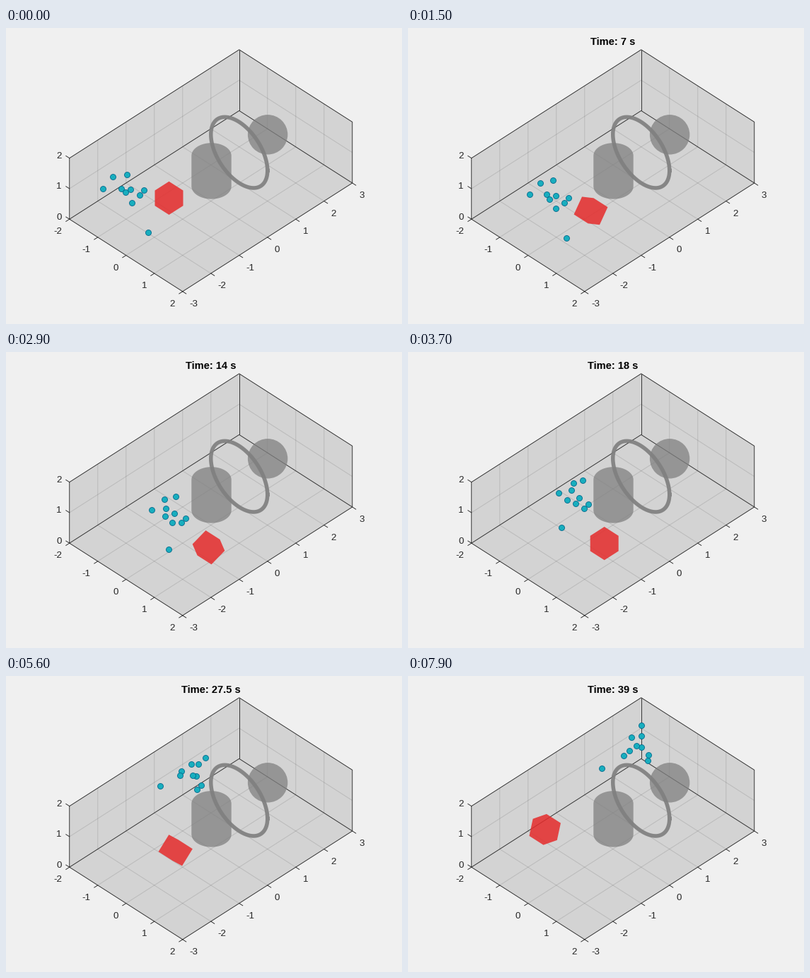
Animation, 560 px wide and 420 px high, one loop 8000 ms. Source, as a matplotlib script:

```python
import numpy as np
import matplotlib.pyplot as plt
from matplotlib.animation import FuncAnimation
from matplotlib.patches import Circle, Polygon

W, H, DPI = 560, 420, 100
FRAMES, INTERVAL = 80, 100
PT = 72 / DPI                      # points per pixel

BACK, PANE, INK = "#f0f0f0", "#d3d3d3", "#262626"
GRAY, RED = "#808080", "#e52b2b"
TEAL, TEAL_EDGE = "#18aebe", "#00648a"
FILL_SHIFT = np.array([0.75, 0.6])  # fills sit on pixel centres, lines do not

plt.rcParams["font.family"] = "Liberation Sans"


def project(x, y, z):
    """Orthographic view, azimuth 45 and elevation 40, in pixels."""
    return np.array([290 + 40 * (x + y), 245.7 + 25.65 * (x - y) - 43.3 * z])


fig = plt.figure(figsize=(W / DPI, H / DPI), dpi=DPI, facecolor=BACK)
ax = fig.add_axes([0, 0, 1, 1])
ax.set_xlim(0.25, W + 0.25)
ax.set_ylim(H + 0.1, 0.1)
ax.axis("off")


def face(*points):
    ax.add_patch(Polygon([project(*p) for p in points], fc=PANE, lw=0, zorder=0))


def line(*points, color=INK, alpha=1.0, width=0.9):
    xy = np.array([project(*p) for p in points])
    ax.plot(xy[:, 0], xy[:, 1], color=color, alpha=alpha, lw=width * PT,
            solid_capstyle="butt", zorder=1)


def tick(point, shift, label, offset, align):
    px, py = project(*point)
    ax.plot([px, px + shift[0]], [py, py + shift[1]], color=INK,
            lw=0.9 * PT, zorder=1)
    ax.text(px + offset[0], py + offset[1], str(label), color=INK,
            fontsize=13.33 * PT, ha=align, va="center_baseline")


# Box, grid and axes
face((-2, -3, 0), (2, -3, 0), (2, 3, 0), (-2, 3, 0))
face((-2, -3, 0), (-2, 3, 0), (-2, 3, 2), (-2, -3, 2))
face((-2, 3, 0), (2, 3, 0), (2, 3, 2), (-2, 3, 2))

grid = dict(alpha=0.14, width=1)
for x in (-1, 0, 1):
    line((x, -3, 0), (x, 3, 0), (x, 3, 2), **grid)
for y in range(-2, 3):
    line((2, y, 0), (-2, y, 0), (-2, y, 2), **grid)
line((-2, -3, 1), (-2, 3, 1), (2, 3, 1), **grid)

line((-2, -3, 0), (2, -3, 0), (2, 3, 0), (-2, 3, 0), (-2, -3, 0))
line((-2, -3, 0), (-2, -3, 2), (-2, 3, 2), (2, 3, 2), (2, 3, 0))
line((-2, 3, 0), (-2, 3, 2))

for x in range(-2, 3):
    tick((x, -3, 0), (-5, 3.2), x, (-10.6, 16.5), "right")
for y in range(-3, 4):
    tick((2, y, 0), (5, 3.2), y, (9.8, 16.5), "left")
for z in range(3):
    tick((-2, -3, z), (-5, -3.2), z, (-11, -4), "right")

# Obstacles
solid = dict(fc=GRAY, alpha=0.75, lw=0)
ax.add_patch(Circle(project(0, 2, 1) + FILL_SHIFT / 2, 28.2, zorder=3, **solid))
turn = np.linspace(0, 2 * np.pi, 121)
ax.plot(*project(np.cos(turn), 1, 1 + np.sin(turn)), color=GRAY, alpha=0.92,
        lw=5.5 * PT, zorder=4)
half = np.linspace(0, np.pi, 61)
rim = np.c_[28.2 * np.cos(half), -18.1 * np.sin(half)]
cylinder = np.r_[project(0, 0, 1.5) + rim, project(0, 0, 0.5) - rim]
ax.add_patch(Polygon(cylinder + FILL_SHIFT, zorder=5, **solid))

# Swarm: one shared route, and a formation that swirls into another
ROUTE = np.array([(173, 234), (203, 243), (231, 236), (237, 198),
                  (254, 149), (290, 114), (320, 102)])
START = np.array([(-36, -6), (-22, -23), (-2, -26), (-10, -6), (-4, -1),
                  (3, -5), (5, 14), (16, 3), (22, -4), (28, 56)])
END = np.array([(-7, 4), (10, -17), (10, -32), (-4, -15), (-15, 11),
                (10, -1), (3, -3), (19, 18), (20, 10), (-46, 29)])


def along(points, u):
    """Smooth curve through evenly timed points, starting at rest."""
    slope = np.gradient(points, axis=0)
    slope[0] = 0
    i = min(int(u * (len(points) - 1)), len(points) - 2)
    s = u * (len(points) - 1) - i
    ease = s * s * (3 - 2 * s)
    return (points[i] + ease * (points[i + 1] - points[i])
            + s * (1 - s) ** 2 * slope[i] - s * s * (1 - s) * slope[i + 1])


def swarm(u):
    offsets = START + u * u * (3 - 2 * u) * (END - START)
    swirl = np.radians(28) * np.sin(np.pi * u * u)
    c, s = np.cos(swirl), np.sin(swirl)
    return along(ROUTE, u) + offsets @ np.array([(c, s), (-s, c)])


def cube_outline(t):
    """Silhouette of a cube sliding along x while it rolls about x."""
    x = 1.49 - abs(0.1 * t - 1.49)
    roll = np.radians(-5 * t)
    c, s = np.cos(roll), np.sin(roll)
    origin = project(0, 0, 0)
    edges = [0.5 * (project(*v) - origin)
             for v in ((1, 0, 0), (0, c, s), (0, -s, c))]
    edges = [e if e[1] > 0 else -e for e in edges]
    edges.sort(key=lambda e: np.arctan2(e[1], e[0]))
    first = project(x, -1.5, 1) + FILL_SHIFT - sum(edges) / 2
    return first + np.cumsum(edges + [-e for e in edges], axis=0)


dots, = ax.plot([], [], "o", ms=8 * PT, mfc=TEAL, mec=TEAL_EDGE,
                mew=0.8 * PT, zorder=2)
cube = ax.add_patch(Polygon(cube_outline(0), fc=RED, alpha=0.85, lw=0, zorder=6))
title = ax.text(290, 19, "", color="black", weight="bold", fontsize=14.67 * PT,
                ha="center", va="center_baseline")


def update(n):
    step = max(n - 1, 0)
    dots.set_data(*swarm(step / (FRAMES - 2)).T)
    cube.set_xy(cube_outline(step / 2))
    title.set_text(f"Time: {step / 2:g} s" if n else "")
    return dots, cube, title


anim = FuncAnimation(fig, update, frames=FRAMES, interval=INTERVAL, repeat=True)
plt.show()
```
